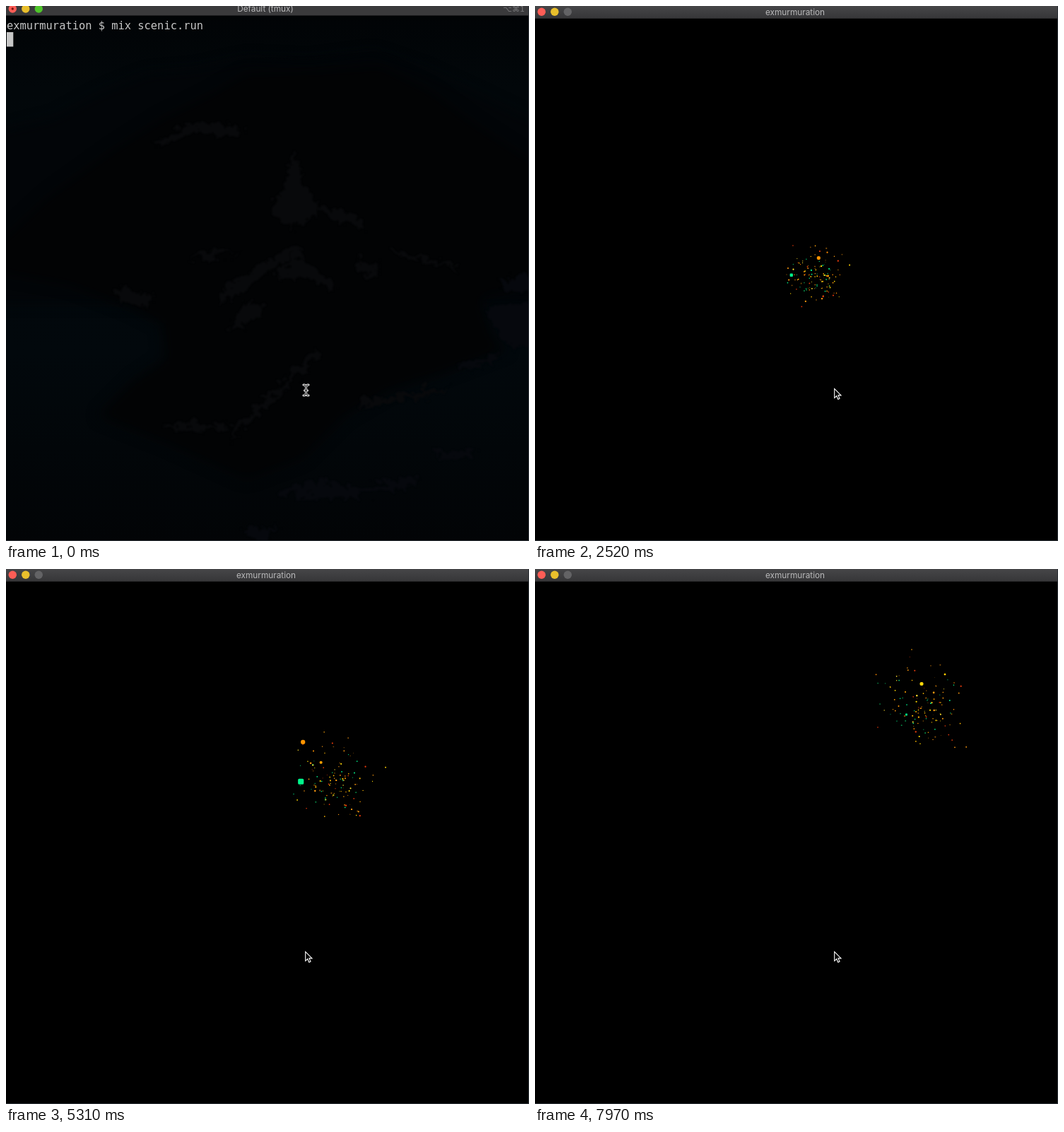
These frames come from a looping animation (740 by 757 pixels, 8 s). An HTML page:

```html
<!DOCTYPE html>
<html lang="en">
<head>
<meta charset="utf-8">
<title>exmurmuration</title>
<style>
  html, body { margin: 0; width: 100%; height: 100%; overflow: hidden; background: #000; }
  svg { display: block; width: 740px; height: 757px; }
  .title { font: 11.8px Inter, Roboto, sans-serif; fill: #b9b9ba; text-anchor: middle; }
  .keys { font: 11px "DejaVu Sans", sans-serif; fill: #767678; text-anchor: end; }
  .mono { font: 15.4px "DejaVu Sans Mono", monospace; fill: #c7c7c7; white-space: pre; }
  .blurred .title { fill: #7c7c7e; }
  .blurred .keys { fill: #58585a; }
  .blurred .light { fill: #606063; }
  .blurred .mark { display: none; }
  .blurred #caret { fill: none; stroke: #c7c7c7; }
</style>
</head>
<body>
<svg viewBox="0 0 740 757">
  <defs>
    <linearGradient id="bar" x2="0" y2="1">
      <stop stop-color="#464648"/><stop offset="1" stop-color="#363638"/>
    </linearGradient>
    <linearGradient id="sky" x2="0" y2="1">
      <stop stop-color="#010305"/><stop offset=".15" stop-color="#02070a"/>
      <stop offset=".65" stop-color="#02080c"/><stop offset="1" stop-color="#020406"/>
    </linearGradient>
    <filter id="soft" color-interpolation-filters="sRGB"><feGaussianBlur stdDeviation="9"/></filter>
    <filter id="rough" x="-10%" y="-10%" width="120%" height="120%" color-interpolation-filters="sRGB">
      <feTurbulence baseFrequency=".05" numOctaves="3" seed="4"/>
      <feDisplacementMap in="SourceGraphic" scale="24" xChannelSelector="R" yChannelSelector="G"/>
      <feGaussianBlur stdDeviation="1.2"/>
    </filter>
    <path id="beamShape" d="M421.5 536q3.5 0 3.5 3v9q0 3-3.5 3M428.5 536q-3.5 0-3.5 3v9q0 3 3.5 3M423 544h4"/>
  </defs>

  <g id="terminal">
    <rect width="740" height="757" fill="url(#sky)"/>
    <path filter="url(#soft)" fill="#020508" d="M-20 180L70 158 130 125 200 96 270 90 340 74 430 78 520 66
      590 90 660 122 760 170V420H-20Z"/>
    <path filter="url(#soft)" fill="#020304" d="M-20 345L60 270 150 205 220 160 290 125 340 95 430 92 530 85
      600 120 660 165 760 230V390L670 412 690 470 710 486 620 520 540 545 480 580 420 640 340 670 230 620
      130 580 180 530 225 500 220 450 170 425 90 395-20 375Z"/>
    <g filter="url(#rough)" fill="#08090b">
      <path d="M200 185L265 160 330 165 325 180 265 172 215 190Z"/>
      <path d="M402 195L412 240 435 275 425 300 395 310 370 285 385 255Z"/>
      <path d="M430 275L495 295 500 310 455 298Z"/>
      <path d="M250 355L290 340 325 345 285 352Z"/>
      <path d="M310 388L400 332 415 340 350 385 295 420Z"/>
      <path d="M405 345L460 385 455 400 425 380 380 380Z"/>
      <path d="M490 350L520 365 515 382 495 370Z"/>
      <path d="M535 335L635 362 630 368 540 342Z"/>
      <path d="M330 415L360 420 340 445 310 450Z"/>
      <path d="M145 395L205 402 190 420 155 415Z"/>
      <path d="M430 478L440 486 375 550 310 610 318 590 385 530Z"/>
      <path d="M215 585L310 588 300 595 220 592Z"/>
      <path d="M495 552L620 535 600 548 500 562Z"/>
    </g>
    <g filter="url(#rough)" fill="#06080d">
      <path d="M380 680L430 668 500 678 580 660 560 678 480 692 410 690Z"/>
      <path d="M330 735L380 732 370 750 335 748Z"/>
      <path d="M670 425L740 410V480L710 478 690 455Z"/>
      <path d="M690 385L740 372V395L705 398Z"/>
      <path d="M630 500L690 488 680 500 640 510Z"/>
      <path d="M600 628L660 622 650 634 605 636Z"/>
    </g>
    <rect width="740" height="14" fill="#3a3a3c"/>
    <rect y="13" width="740" height="1" fill="#1c1c1e"/>
    <circle class="light" cx="9.3" cy="4" r="5.7" fill="#fd5d56"/>
    <circle class="mark" cx="9.3" cy="4" r="1.7" fill="#7d130f"/>
    <circle class="light" cx="27.8" cy="4" r="5.7" fill="#e9bf2c"/>
    <circle class="light" cx="46.3" cy="4" r="5.7" fill="#4fc52b"/>
    <text class="title" x="367" y="8.3">Default (tmux)</text>
    <text class="keys" x="734" y="8">⌥⌘1</text>
    <text class="mono" x="1" y="33">exmurmuration $ mix scenic.run</text>
    <rect id="caret" x="1" y="37" width="9.3" height="20.5" fill="#c7c7c7"/>
    <g id="beam" fill="none" transform="translate(-.5)">
      <use href="#beamShape" stroke="#e8e8e8" stroke-width="3" stroke-linecap="round"/>
      <use href="#beamShape" stroke="#111"/>
    </g>
  </g>

  <g id="scene">
    <rect width="740" height="757"/>
    <rect width="740" height="18" fill="url(#bar)"/>
    <rect y="17" width="740" height="1" fill="#262628"/>
    <circle cx="9.3" cy="8.3" r="5.7" fill="#fd5d56"/>
    <circle cx="27.8" cy="8.3" r="5.7" fill="#e9bf2c"/>
    <circle cx="46.3" cy="8.3" r="5.7" fill="#636365"/>
    <text class="title" x="368" y="13">exmurmuration</text>
    <g id="flock"></g>
  </g>

  <path d="M739.5 0V757M0 756.5H740" stroke="#2b3036" fill="none"/>
  <path id="arrow" d="M423.7 541.5V554.6L426.7 551.8 428.8 556.5 431 555.5 429 550.9H433Z"
    fill="#000" stroke="#fff" stroke-width="1.1"/>
</svg>
<script>
const LOOP = 8000, BLUR_AT = 150, OPEN_AT = 450, STEP = 147.45;
const $ = id => document.getElementById(id);
const show = (el, on) => el.setAttribute('display', on ? 'inline' : 'none');

let seed = 71;
const rand = () => {
  seed = (seed * 1664525 + 1013904223) % 4294967296;
  return seed / 4294967296;
};
const gauss = () => Math.sqrt(-2 * Math.log(1 - rand())) * Math.cos(2 * Math.PI * rand());

// Value of a keyed track at a time in seconds; the ends extend in a line.
const KEYS = [0.89, 1.93, 3.26, 5.31, 6.93, 7.97];
function at(track, s) {
  let i = 0;
  while (i < KEYS.length - 2 && s > KEYS[i + 1]) i++;
  const u = (s - KEYS[i]) / (KEYS[i + 1] - KEYS[i]);
  return track[i] + (track[i + 1] - track[i]) * u;
}

const flock = {
  x: [381, 389, 407, 462, 511, 547],
  y: [395, 387, 369, 296, 230, 190],
  spread: [12, 17, 21.5, 26, 29, 30]
};

// Birds that pass close to the viewer or fly at the edge.
const leaders = [
  { color: '#00f58c', square: true, x: [363, 363, 362.5, 417, 477, 525.5], y: [404, 388, 371.5, 301, 235.5, 206], r: [1, 1.8, 2.6, 4.1, 2, 1.4] },
  { color: '#ff9500', x: [378, 382, 426, 420, 471.5, 514.5], y: [397, 382, 324, 245, 225, 194], r: [1, 3.1, 2, 3.1, 1.3, 1] },
  { color: '#ff9f00', x: [384, 397, 437, 445.5, 489, 524], y: [402, 396, 364, 274, 217, 174], r: [1, 1.4, 1.4, 2, 1.2, 1] },
  { color: '#ffd90a', x: [386, 398, 414, 474, 525, 547], y: [388, 366, 371, 276, 208, 162.5], r: [1, 1.2, 1, 1.1, 1, 2.6] },
  { color: '#00e886', x: [376, 387, 396, 475, 501.5, 560], y: [387, 373, 375, 287, 234, 190], r: [1, 1, 1.3, 0.9, 2, 1] },
  { color: '#ffd000', x: [404, 428, 467, 537, 553, 580], y: [387, 376, 354.5, 281, 189, 149], r: Array(5).fill(0.95).concat(1.3) },
  { color: '#e03408', x: [357, 369, 388, 425, 446, 485], y: [400, 428, 422, 339, 268, 224], r: Array(6).fill(0.85) },
  { color: '#ffa50a', x: [370, 379, 419, 450, 495, 533], y: [369, 349, 327, 231, 159, 114], r: Array(6).fill(0.8) }
];

const COLORS = ['#ffa000', '#ff8a00', '#ffb800', '#ffd800', '#ffe030', '#ff9a10', '#e83a0c', '#00e082', '#0a8a48', '#7a4a08'];
const birds = Array.from({ length: 118 }, () => {
  const gx = gauss(), gz = gauss(), gy = gauss();
  return {
    color: COLORS[Math.floor(rand() * COLORS.length)],
    reach: Math.min(Math.hypot(gx, gz), 2.2),
    angle: Math.atan2(gz, gx),
    turn: (rand() - 0.5) * 0.8,
    lift: Math.max(-2, Math.min(1.9, gy)),
    bob: rand() * 2 * Math.PI,
    size: 0.5 + rand() * 0.5
  };
});

function addDot(item) {
  item.el = document.createElementNS('http://www.w3.org/2000/svg', 'rect');
  item.el.setAttribute('fill', item.color);
  $('flock').append(item.el);
}
birds.concat(leaders).forEach(addDot);

function place(item, x, y, r) {
  const set = (name, v) => item.el.setAttribute(name, v.toFixed(2));
  set('x', x - r);
  set('y', y - r);
  set('width', 2 * r);
  set('height', 2 * r);
  set('rx', item.square ? r * 0.45 : r * 0.9);
}

function drawFlock(s) {
  const cx = at(flock.x, s), cy = at(flock.y, s), spread = at(flock.spread, s);
  for (const b of birds) {
    const a = b.angle + b.turn * s;
    const depth = b.reach * Math.sin(a);
    const lift = b.lift + 0.2 * Math.sin(s * 0.9 + b.bob);
    place(b, cx + spread * b.reach * Math.cos(a), cy + spread * lift,
      Math.max(0.4, b.size * (1 + 0.18 * depth)));
  }
  for (const l of leaders) place(l, at(l.x, s), at(l.y, s), at(l.r, s));
}

function draw(t) {
  const open = t >= OPEN_AT, blurred = t >= BLUR_AT;
  show($('terminal'), !open);
  show($('scene'), open);
  show($('beam'), !blurred);
  show($('arrow'), blurred);
  $('terminal').classList.toggle('blurred', blurred);
  if (open) {
    const step = Math.floor((t - OPEN_AT + 9) / STEP);
    drawFlock((OPEN_AT + step * STEP) / 1000);
  }
}

const start = performance.now();
function tick() {
  draw((performance.now() - start) % LOOP);
  requestAnimationFrame(tick);
}
tick();
</script>
</body>
</html>
```
